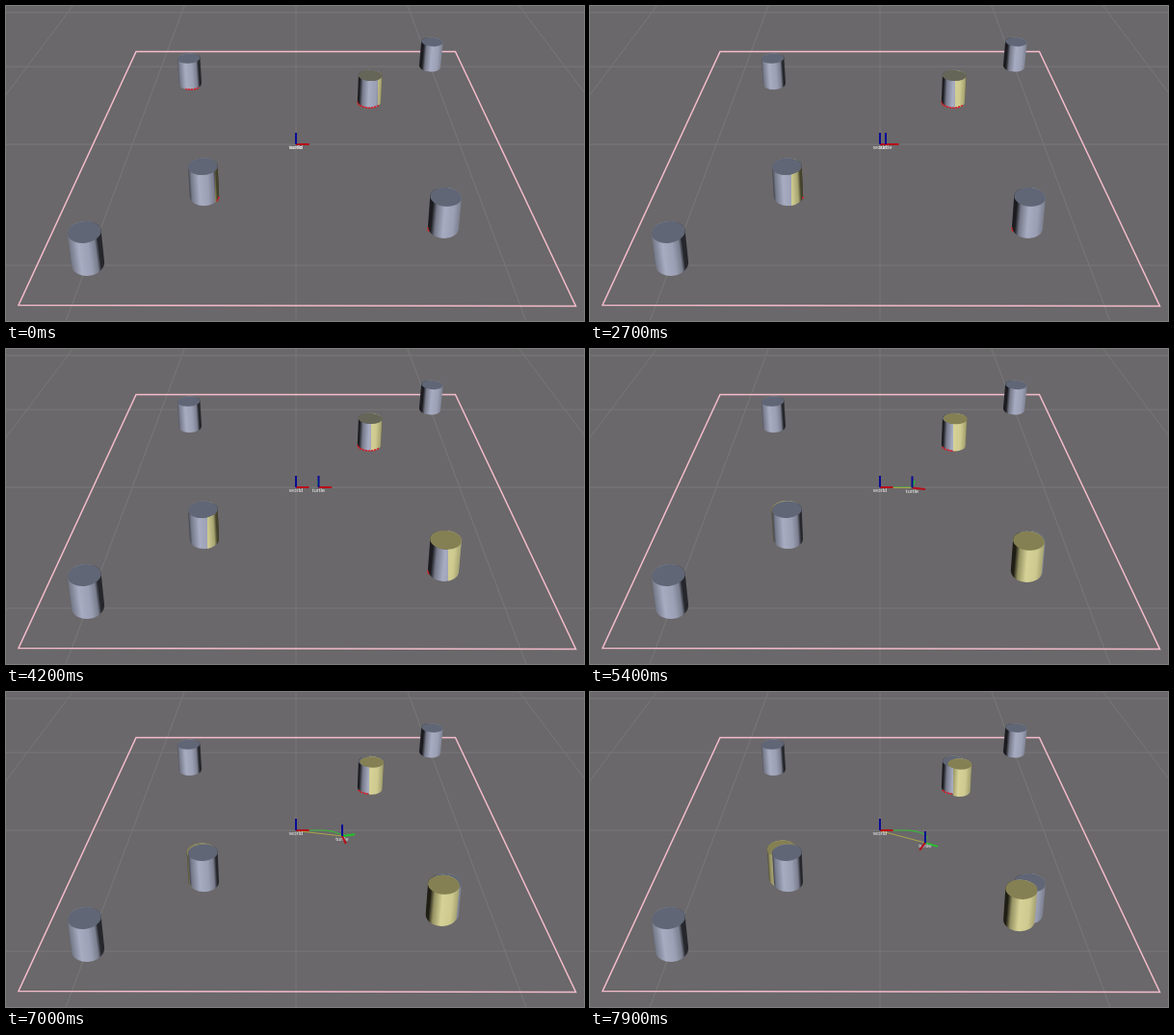
An HTML page with a canvas that plays this animation: 600x328 px, repeating every 8 s.

```html
<!DOCTYPE html>
<html>
<head>
<meta charset="utf-8">
<style>
html, body { margin: 0; width: 100%; height: 100%; overflow: hidden; background: #6a686a; }
canvas { display: block; }
</style>
</head>
<body>
<canvas id="stage" width="600" height="328"></canvas>
<script>
const g = document.getElementById('stage').getContext('2d');
const LOOP = 8000, STEP = 100, TURN = 4300;
const CX = 301, HORIZON = -309, UNIT = 0.375, NEAR = 0.002207, DEPTH = 0.00048;
const GREY = ['#1c1c20', '#757989', '#a8acc2', '#9b9fb4', '#7a7e8e', '#26272c'];
const YELLOW = ['#1f1e14', '#959163', '#d6d297', '#cdc98f', '#a7a372', '#45432a'];
const GREY_TOP = '#606675', YELLOW_TOP = '#858053';

// Ground plane (x right, y away) to screen and back
function project([x, y]) {
  const s = 1 / (NEAR + DEPTH * y);
  return [CX + x * UNIT * s, s + HORIZON];
}
function ground([x, y]) {
  const s = y - HORIZON;
  return [(x - CX) / (UNIT * s), (1 / s - NEAR) / DEPTH];
}
function rotate([x, y], a) {
  const c = Math.cos(a), s = Math.sin(a);
  return [x * c - y * s, x * s + y * c];
}

function line(points, color, width) {
  g.beginPath();
  points.forEach(p => g.lineTo(...p));
  g.strokeStyle = color;
  g.lineWidth = width;
  g.stroke();
}

function cylinder([x, y], shades, top, clipX = 0) {
  const s = y - HORIZON, rx = 0.0298 * s, ry = 0.0000389 * s * s;
  const tx = CX + (x - CX) * 1.017, ty = y - s * (0.0913 - 0.0000605 * s);
  const tilt = (x - CX) * 0.0006, shift = (x - CX) * 0.02;
  const fill = g.createLinearGradient(x - rx + shift, y, x + rx + shift, y + 2 * rx * tilt);
  [0, 0.14, 0.4, 0.7, 0.9, 1].forEach((p, i) => fill.addColorStop(p, shades[i]));
  g.save();
  g.beginPath();
  g.rect(clipX, 0, 600, 328);
  g.clip();
  g.beginPath();
  g.ellipse(x, y, rx, ry, tilt, 0, Math.PI);
  g.ellipse(tx, ty, rx * 1.015, ry * 0.87, tilt, Math.PI, 2 * Math.PI);
  g.fillStyle = fill;
  g.fill();
  g.restore();
  g.beginPath();
  g.ellipse(tx, ty, rx * 1.015, ry * 0.87, tilt, 0, 2 * Math.PI);
  g.fillStyle = top;
  g.fill();
}

function scan([x, y], from, to) {
  const s = y - HORIZON;
  g.beginPath();
  g.ellipse(x, y, 0.0298 * s, 0.0000389 * s * s, 0, from * Math.PI, to * Math.PI);
  g.setLineDash([2.2, 0.8]);
  g.strokeStyle = '#d51f2a';
  g.lineWidth = 1.6;
  g.stroke();
  g.setLineDash([]);
}

// Time, screen x, screen y, heading
const KEYS = [
  [0, 301, 144, 0], [2100, 301, 144, 0], [2700, 307, 144, 0], [4200, 324.5, 144, 0],
  [5400, 334.5, 144.5, -0.2], [6300, 344.5, 147, -0.85],
  [7000, 349, 150, -1.35], [7900, 348, 157, -2.05], [8000, 347.5, 157.8, -2.12]
];

function sample(t, n) {
  const last = KEYS.length - 1;
  let i = 0;
  while (i < last - 1 && t >= KEYS[i + 1][0]) i++;
  const slope = k => {
    const a = KEYS[Math.max(0, k - 1)], b = KEYS[Math.min(last, k + 1)];
    return (b[n] - a[n]) / (b[0] - a[0]);
  };
  const a = KEYS[i], b = KEYS[i + 1], d = b[0] - a[0], u = (t - a[0]) / d, v = 1 - u;
  return a[n] * v * v * (1 + 2 * u) + b[n] * u * u * (3 - 2 * u)
    + d * u * v * (v * slope(i) - u * slope(i + 1));
}
const robot = t => [Math.max(CX, sample(t, 1)), Math.max(144, sample(t, 2))];
const heading = t => t < TURN ? 0 : Math.min(0, sample(t, 3));

function axes(pos, angle, name) {
  const base = ground(pos);
  const tip = (x, y) => {
    const d = rotate([x, y], angle);
    return project([base[0] + d[0], base[1] + d[1]]);
  };
  g.fillStyle = '#eee';
  g.font = '6px "Liberation Sans", Arial, sans-serif';
  g.textAlign = 'center';
  g.fillText(name, pos[0], pos[1] + 5.2);
  line([pos, tip(0, 0.08)], '#1fc52a', 1.8);
  line([pos, tip(0.08, 0)], '#b80d18', 2);
  line([pos, [pos[0], pos[1] - 12]], '#0a0a94', 2);
}

const [A, B, C, D, E, F] =
  [[191.5, 81], [377, 99.5], [440, 63], [206, 198], [454, 230.5], [85, 268]];

function obstacles(t) {
  const turning = t >= TURN;
  // Estimates lag behind the turn and are refreshed every second step
  const rate = turning ? (heading(t - 100) - heading(t)) * 10 : 0;
  const lag = rate * (t / STEP % 2 ? 0.088 : 0.025);
  const estimate = (p, clipX, top = YELLOW_TOP) =>
    cylinder(project(rotate(ground(p), -lag)), YELLOW, top, clipX);

  if (turning) estimate(D);
  [A, C, B, D, E, F].forEach(p => cylinder(p, GREY, GREY_TOP));
  if (t < 1000) scan(A, 0.25, 0.65);
  if (turning) {
    scan(B, 0.45, 0.9);
    estimate(B, 377);
    estimate(E);
    return;
  }
  const early = t < 1000;
  estimate(B, early ? 386 : 379, '#656657');
  estimate(D, early ? 217 : 209, GREY_TOP);
  if (t >= 3000) estimate(E, 459);
  scan(B, 0.2, 1);
  if (t < 2800) scan(D, 0.02, early ? 0.18 : 0.1);
  scan(E, 0.88, 1);
}

function draw(t) {
  g.fillStyle = '#6a686a';
  g.fillRect(0, 0, 600, 328);
  for (let i = -4; i <= 4; i++) {
    const k = i * UNIT;
    line([[CX + k * -HORIZON, 0], [CX + k * (328 - HORIZON), 328]], '#797779', 1);
  }
  for (let i = -1; i <= 2; i++) {
    const y = project([0, i])[1];
    line([[0, y], [600, y]], '#797779', 1);
  }
  line([[135, 47.5], [466.5, 47.5], [591.5, 312.5], [13, 311.5], [135, 47.5], [140, 47.5]], '#f4bccb', 1.5);
  obstacles(t);

  const pos = robot(t);
  if (t > TURN) {
    const trail = [];
    for (let s = 2100; s <= t; s += STEP) trail.push(robot(s));
    line(trail, '#38b838', 1.1);
    line([[CX, 144.5], pos], '#ada34a', 1);
  }
  axes([CX, 144], 0, 'world');
  axes(pos, heading(t), 'turtle');
}

function tick(now) {
  draw(Math.floor(now % LOOP / STEP) * STEP);
  requestAnimationFrame(tick);
}
requestAnimationFrame(tick);
</script>
</body>
</html>
```
